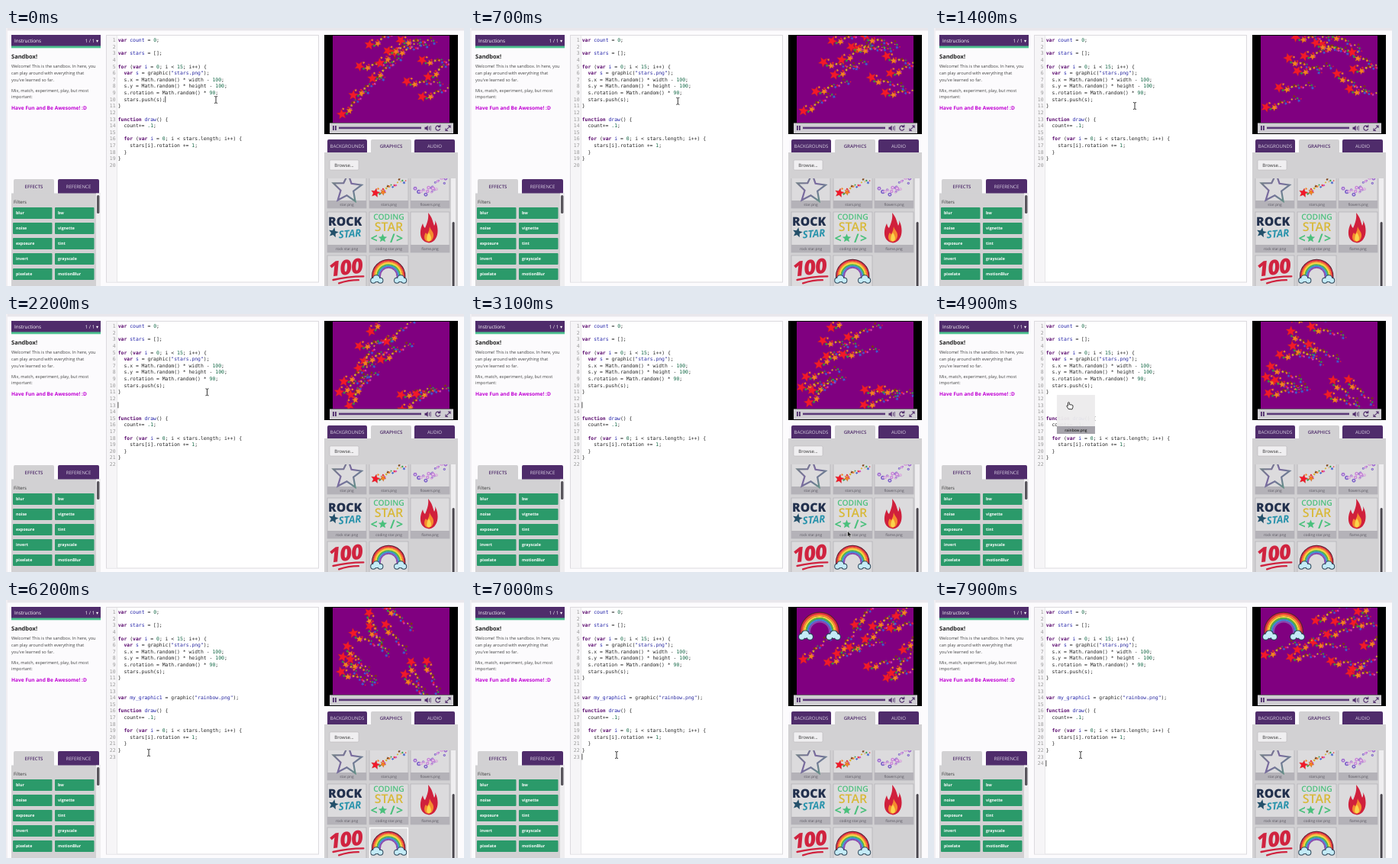
Recreate the animation shown at these times as an HTML page. Size 600 by 338 pixels, loop 8000 ms.

```html
<!DOCTYPE html>
<html>
<head>
<meta charset="utf-8">
<style>
html, body { margin: 0; width: 100%; height: 100%; overflow: hidden; background: #fcfbfd; }
svg { display: block; width: 600px; height: 338px; }
text { font-family: "Open Sans", "Noto Sans", sans-serif; text-rendering: geometricPrecision; white-space: pre; }
.mono text { font: 6.43px "DejaVu Sans Mono", monospace; fill: #222; }
.mono .num { fill: #999; text-anchor: end; }
.key { fill: #5a0a6e; font-weight: bold; }
.str { fill: #2a2aa0; }
.lit { fill: #116644; }
.def { fill: #2020a8; }
</style>
</head>
<body>
<svg viewBox="0 0 600 338">
  <defs>
    <clipPath id="stageClip"><rect x="428" y="10" width="153" height="114"/></clipPath>
    <clipPath id="gridClip"><rect x="417" y="197" width="165" height="141"/></clipPath>
    <linearGradient id="starInk" x2="1" y2="1">
      <stop offset="0" stop-color="#6f8c7c"/><stop offset=".5" stop-color="#7a68a0"/><stop offset="1" stop-color="#5f9a80"/>
    </linearGradient>
    <g id="swoosh"></g>
    <g id="rainbow"></g>
  </defs>
  <g id="page"></g>
  <g id="stage" clip-path="url(#stageClip)"></g>
  <g id="code" class="mono"></g>
  <rect id="caret" width=".8" height="8" fill="#222"/>
  <rect id="focus" x="476.5" y="298.5" width="50" height="54" fill="none" stroke="#fff" stroke-width="1.6"/>
  <g id="ghost">
    <g id="trail"><rect class="lag" width="50" height="50"/><rect class="lag" width="50" height="50"/></g>
    <g id="drag"></g>
  </g>
  <g id="beam" fill="none" stroke="#333" stroke-width="1"><path d="M-2-4.5Q0-4.5 0-3.5Q0-4.5 2-4.5M0-3.5V3.5M-2 4.5Q0 4.5 0 3.5Q0 4.5 2 4.5"/></g>
  <g id="arrow"><path d="M-1.5-4V4L.4 2.3L1.6 5L3 4.4L1.8 1.8H4.3Z" fill="#222" stroke="#fff" stroke-width=".6"/><circle id="plus" cx="5" cy="4" r="2.3" fill="#4f9a3c"/></g>
  <g id="hand"><path d="M-1.8 4.5L-4.2 .5Q-4-.9-2.4 .3V-4Q-1.4-5.2-.6-4V-1.2Q2.8-1.6 4-.2V2.2L3 4.8Z" fill="#fff" stroke="#222" stroke-width=".9"/></g>
</svg>
<script>
const LOOP = 8000, PURPLE = '#4f2c6b', GRAY = '#d2d1d3', TRACK = '#efeef0', GREEN = '#2b9a6a';
const CHAR = 3.87, LINE = 8.61, CODE_X = 146.7;
const $ = id => document.getElementById(id);

function random(seed) {
  return () => (seed = (seed * 16807) % 2147483647) / 2147483647;
}
const rect = (x, y, w, h, fill, more = '') =>
  `<rect x="${x}" y="${y}" width="${w}" height="${h}" fill="${fill}" ${more}/>`;
const label = (s, x, y, size, fill, more = '') =>
  `<text x="${x}" y="${y}" font-size="${size}" fill="${fill}" ${more}>${s}</text>`;
const path = (d, fill, more = '') => `<path d="${d}" fill="${fill}" ${more}/>`;
const MID = 'text-anchor="middle"', BOLD = 'font-weight="bold"';

function star(x, y, r, fill, turn = 0, more = '') {
  let pts = '';
  for (let i = 0; i < 10; i++) {
    const a = turn + i * Math.PI / 5 - Math.PI / 2, d = i % 2 ? r * 0.45 : r;
    pts += `${(x + d * Math.cos(a)).toFixed(2)},${(y + d * Math.sin(a)).toFixed(2)} `;
  }
  return `<polygon points="${pts}" fill="${fill}" ${more}/>`;
}

// Reusable pictures
function makeSwoosh() {
  const rnd = random(4711);
  const small = ['#f58220', '#2f9e3f', '#3d5fd0', '#e8202c', '#d63fb0', '#d8b020', '#7a3c10'];
  let s = '';
  for (let i = 0; i < 18; i++) {
    const t = i / 17, x = 4 + t * 40, y = -t * 19 + (rnd() - 0.5) * 13;
    s += star(x, y, 1 + rnd() * 1.5, small[i % small.length], rnd() * 6);
  }
  return s + star(11, -1, 4.6, '#f58220', 0.5, 'stroke="#a0401c" stroke-width=".3"') +
    star(0, 0, 6.8, '#f2182a', 0.2, 'stroke="#b0301c" stroke-width=".3"');
}

function makeRainbow() {
  const bands = ['#e2303f', '#f58a2c', '#f8d83c', '#4fb548', '#3a8fd8', '#8a4bb0'];
  const puffs = [[-20, 5.8, 4], [-16, 3.2, 5], [-10.8, 5.8, 4]];
  let s = path('M-21.5 4V0A21.5 21.5 0 0 1 21.5 0V4', 'none', 'stroke="#5a2030" stroke-width="1.4"');
  bands.forEach((c, i) => {
    const r = 20.2 - i * 1.8;
    s += path(`M${-r} 4V0A${r} ${r} 0 0 1 ${r} 0V4`, 'none', `stroke="${c}" stroke-width="1.9"`);
  });
  for (const side of [-1, 1]) for (const edge of [1, 0]) for (const [x, y, r] of puffs)
    s += `<circle cx="${x * side}" cy="${y}" r="${r - 1 + edge}" fill="${edge ? '#2b4558' : '#c4ebf7'}"/>`;
  return s;
}

function tab(name, x, y, w, h, active) {
  return path(`M${x} ${y + h}V${y + 2}q0-2 2-2H${x + w - 2}q2 0 2 2V${y + h}Z`, active ? GRAY : PURPLE) +
    label(name, x + w / 2, y + h / 2 + 2.2, 6.1, active ? PURPLE : '#d9d0e2', MID + (active ? ' font-weight="600"' : ''));
}

function card(x, y, name) {
  return rect(x, y, 51, 53, '#dcdbdd', 'stroke="#b5b3b8" stroke-width=".8"') +
    rect(x, y + 43, 51, 10, '#b4b2b8') + label(name, x + 25.5, y + 49.6, 4.8, '#5d5a63', MID);
}

function leftPanel() {
  let s = rect(7, 9, 117, 15, PURPLE) + rect(7, 23.5, 117, 2.8, '#4cc18f') +
    label('Instructions', 11, 18.6, 6.35, '#fff') + label('1 / 1 ▾', 121, 18.6, 6.2, '#fff', 'text-anchor="end"') +
    label('Sandbox!', 7, 39.5, 7.5, '#222', BOLD);
  ['Welcome! This is the sandbox. In here, you', "can play around with everything that", "you've learned so far.",
    'Mix, match, experiment, play, but most', 'important:'].forEach((row, i) => {
    s += label(row, 7, 52.3 + i * 8.6 + (i > 2 ? 5.6 : 0), 5.6, '#444');
  });
  s += label('Have Fun and Be Awesome! :D', 7, 107, 6.6, '#c000d4', BOLD) +
    tab('EFFECTS', 10, 198, 53, 19, true) + tab('REFERENCE', 68, 198, 54, 19, false) +
    rect(7, 216.5, 117, 122, GRAY) + label('Filters', 10, 229.5, 6, '#333') +
    rect(118, 216.5, 6, 122, TRACK) + rect(119, 219, 3.4, 24, '#58555c', 'rx="1.5"');
  ['blur', 'bw', 'noise', 'vignette', 'exposure', 'tint', 'invert', 'grayscale', 'pixelate', 'motionBlur'].forEach((name, i) => {
    const x = i % 2 ? 64 : 9, y = 235 + (i >> 1) * 20;
    s += rect(x, y, 51.5, 15, GREEN, 'rx="1"') + label(name, x + 4, y + 9.4, 5.3, '#fff', BOLD);
  });
  return s;
}

function player() {
  return rect(417, 9, 175, 130, '#000') + rect(428, 10, 153, 114, '#800080') + rect(424, 124.5, 162, 13.5, '#d0ced3') +
    rect(428, 128, 1.8, 6, PURPLE) + rect(431, 128, 1.8, 6, PURPLE) + rect(436, 129.6, 108, 2.6, '#5b3a78') +
    path('M548.5 129.7h1.8l2.4-2v7l-2.4-2h-1.8zM554 129v4.4h.8V129zM555.8 128v6.4h.8V128z', PURPLE) +
    path('M568.2 129.3A3 3 0 1 0 568.7 132M566 129.6h2.8v-2.8', 'none', `stroke="${PURPLE}" stroke-width="1.1"`) +
    path('M576.5 134L581.5 128.5M579 128h3v3M576 131.5v3h3', 'none', `stroke="${PURPLE}" stroke-width="1.1"`);
}

function graphics() {
  const rnd = random(99);
  let s = card(421, 183, 'star.png') + card(476, 183, 'stars.png') + card(530, 183, 'flowers.png') +
    card(421, 241, 'rock star.png') + card(476, 241, 'coding star.png') + card(530, 241, 'flame.png') +
    card(421, 298, '100.png') + card(476, 298, 'rainbow.png');
  s += star(447, 210.5, 19.5, 'none', 0.06, 'stroke="url(#starInk)" stroke-width="2.2"') +
    '<use href="#swoosh" transform="translate(484 216) scale(.9)"/>';
  for (let i = 0; i < 24; i++) {
    const x = 536 + rnd() * 40, y = 217 - (x - 536) * 0.4 + (rnd() - 0.5) * 14, r = 1 + rnd() * 1.8;
    s += `<circle cx="${x}" cy="${y}" r="${r}" fill="${['#a070d0', '#c98ad8', '#7f66c8', '#d3a4d8'][i % 4]}"/>` +
      `<circle cx="${x}" cy="${y}" r="${r * 0.35}" fill="#f2e4f2"/>`;
  }
  s += label('ROCK', 422, 258.7, 15.8, '#22304d', 'font-weight="800"') + star(429, 268, 6.8, '#24506a', 0.2) +
    '<g transform="rotate(-5 452 269)">' +
    label('STAR', 435.5, 274, 13.4, '#2a93ac', 'font-weight="bold" font-style="italic"') + '</g>' +
    label('CODING', 501.5, 251, 10.3, '#4ac07c', MID + ' font-weight="600"') +
    label('STAR', 501.5, 266.3, 16, '#d8b93a', MID + ' font-weight="600"') +
    label('&lt;', 477.5, 281, 16, '#4ac07c', BOLD) + star(493.5, 275.5, 6, '#4ac07c') +
    label('/&gt;', 503, 281, 16, '#4ac07c', BOLD + ' letter-spacing="1.5"');
  s += path('M553 242C559 249 559 254 561 259Q563 256 562 252C568 262 567 280 554 281.5C541 280 541 266 546 256Q547 261 549 262C552 255 554 249 553 242Z', '#d0203c') +
    path('M555 260C556 265 561 267 560 273C559 278 556 280 553 280C547 279 547 272 550 268Q551 270 552 270Q555 265 555 260Z', '#f58b2e') +
    path('M554 268Q558 274 556.5 278Q554 280.5 551.5 278Q550.5 273 554 268Z', '#fad54c');
  s += '<g transform="rotate(-7 446 316)">' +
    label('100', 445, 323, 27, '#d0233f', MID + ' font-weight="800" font-style="italic" letter-spacing="-1"') +
    path('M427 327.8Q446 325.5 467 328M434 333Q447 330.5 460 332', 'none', 'stroke="#d0233f" stroke-width="2.4" stroke-linecap="round"') + '</g>';
  return s + '<use href="#rainbow" x="501.2" y="325"/>';
}

function rightPanel() {
  return player() + tab('BACKGROUNDS', 421, 146, 52, 18, false) + tab('GRAPHICS', 478, 146, 53, 18, true) +
    tab('AUDIO', 535, 146, 53, 18, false) + rect(417, 163, 175, 175, GRAY) +
    rect(424, 173, 38, 13, '#f0eff1', 'rx="1.5" stroke="#b9b7bb" stroke-width=".6"') + label('Browse...', 443, 181.8, 6, '#333', MID) +
    `<g clip-path="url(#gridClip)">${graphics()}</g>` + rect(583, 197, 6, 141, TRACK) + rect(584.6, 254, 3, 90, '#4a474e', 'rx="1.5"');
}

// Source text shown in the editor
const head = ['var count = 0;', '', 'var stars = [];', '', 'for (var i = 0; i < 15; i++) {', '  var s = graphic("stars.png");',
  '  s.x = Math.random() * width - 100;', '  s.y = Math.random() * height - 100;', '  s.rotation = Math.random() * 90;', '  stars.push(s);', '}'];
const tail = ['function draw() {', '  count+= .1;', '', '  for (var i = 0; i < stars.length; i++) {', '    stars[i].rotation += 1;', '  }', '}', ''];
const dropped = ['', '', 'var my_graphic1 = graphic("rainbow.png");', ''];
const edits = [[0, ['']], [1650, ['', '']], [1900, ['', '', '']], [5200, dropped], [7500, dropped, ['']]];

function paint(line) {
  const span = (kind, s) => `<tspan class="${kind}">${s}</tspan>`;
  return line.replace(/"[^"]*"|\b(var|function)( )(\w+)|\bfor\b|\.?\b\d+\b|</g, (m, word, gap, name) =>
    word ? span('key', word) + gap + span('def', name)
      : m === '<' ? '&lt;' : m === 'for' ? span('key', m) : span(m[0] === '"' ? 'str' : 'lit', m));
}
function codeMarkup([, middle, extra = []]) {
  return [...head, ...middle, ...tail, ...extra].map((line, i) => {
    const y = 18.2 + i * LINE;
    return `<text class="num" x="143.5" y="${y}">${i + 1}</text><text x="${CODE_X}" y="${y}">${paint(line)}</text>`;
  }).join('');
}

// Each run: start, time at which the big stars sit on the given places, seed, places
const runs = [
  [0, 0, 11, [463,50, 480,66, 490,46, 508,32, 517,16, 476,22, 440,113, 455,88, 545,42, 553,64, 545,90, 525,70, 500,30]],
  [2000, 3100, 23, [495,30, 462,35, 467,55, 457,66, 489,53, 440,82, 434,96, 448,100, 444,116, 473,18, 517,99, 537,98, 516,119]],
  [6600, 7900, 37, [500,27, 497,55, 525,28, 550,30, 555,15, 467,75, 476,65, 433,72, 520,80, 545,95, 563,60, 515,45, 548,90]]
].map(([start, rest, seed, at]) => {
  const rnd = random(seed * 7919), sprites = [];
  for (let i = 0; i < at.length; i += 2) sprites.push({ x: at[i], y: at[i + 1], turn: rnd() * 55 - 20 });
  return { start, rest, sprites };
});

const mouse = [[0, 275, 94], [500, 275, 94], [1400, 263, 102], [2200, 263, 102], [2700, 490, 268], [3100, 496, 288], [3350, 502, 320],
  [3500, 502, 320], [4100, 322, 161], [4600, 190, 118], [4900, 178, 120], [5200, 168, 128], [5500, 168, 130], [6200, 187, 200],
  [6600, 192, 203], [8000, 192, 203]];
function mouseAt(t) {
  const i = Math.max(1, mouse.findIndex(k => k[0] > t));
  const [t0, x0, y0] = mouse[i - 1], [t1, x1, y1] = mouse[i];
  const u = (t - t0) / (t1 - t0);
  return [x0 + (x1 - x0) * u, y0 + (y1 - y0) * u];
}
function caretAt(t) {
  if (t < 1500) return [10, 16];
  if (t < 1650) return [11, 1];
  if (t < 3500) return [t < 1900 ? 12 : 13, 0];
  return t < 6600 ? null : [t < 7500 ? 23 : 24, 0];
}

$('swoosh').innerHTML = makeSwoosh();
$('rainbow').innerHTML = makeRainbow();
$('page').innerHTML = rect(0, 0, 600, 338, '#fcfbfd') + rect(0, 0, 600, 3.5, '#e9e7ec') + rect(0, 0, 2, 338, '#f0eef2') +
  rect(131.5, 9.5, 278, 323.5, '#fff', 'stroke="#dcdade" stroke-width="1"') + rect(132, 10, 13.2, 322.5, '#f6f5f7') +
  rect(145, 10, 0.7, 322.5, '#dddbdf') + leftPanel() + rightPanel();
$('stage').innerHTML = '<use class="sprite" href="#swoosh"/>'.repeat(13) +
  '<use id="bow" href="#rainbow" transform="translate(458 41.5) scale(1.17)"/>';
$('drag').innerHTML = rect(0, 0, 50, 51, '#ecebed', 'opacity=".95"') + rect(0, 41, 50, 10, '#a5a3aa') +
  label('rainbow.png', 25, 47.8, 4.9, '#222', MID + ' font-weight="600"');
const sprites = document.querySelectorAll('.sprite'), lags = document.querySelectorAll('.lag');
lags.forEach(el => { el.setAttribute('fill', '#f1f0f2'); el.setAttribute('stroke', '#d6d4d9'); el.setAttribute('stroke-width', '.7'); });

const show = (id, on) => { $(id).style.display = on ? '' : 'none'; };
const move = (el, x, y) => el.setAttribute('transform', `translate(${x} ${y})`);
const latest = (list, t, time) => list.filter(e => time(e) <= t).pop();
let shownEdit;

function draw(now) {
  const t = now % LOOP;
  const edit = latest(edits, t, e => e[0]);
  if (edit !== shownEdit) $('code').innerHTML = codeMarkup(shownEdit = edit);

  // Every swoosh spins about its own middle
  const run = latest(runs, t, r => r.start), spin = (t - run.rest) * 0.02;
  run.sprites.forEach((s, i) => sprites[i].setAttribute('transform',
    `translate(${s.x} ${s.y}) rotate(${s.turn}) rotate(${spin} 20 -9)`));
  show('bow', t >= 6600);
  show('focus', t >= 5200 && t < 6600);

  const caret = caretAt(t);
  show('caret', caret && (t + 100) % 1000 < 500);
  if (caret) move($('caret'), CODE_X + caret[1] * CHAR - 0.2, 12 + (caret[0] - 1) * LINE);

  const [x, y] = mouseAt(t), dragging = t >= 3500 && t < 5200;
  const typing = (t > 1650 && t < 2200) || (t > 7500 && t < 7700);
  const kind = dragging ? (t < 4500 ? 'arrow' : 'hand') : x > 146 && x < 409 ? 'beam' : 'arrow';
  for (const id of ['beam', 'arrow', 'hand']) {
    show(id, id === kind && !typing);
    move($(id), x, y);
  }
  show('plus', dragging);
  show('ghost', dragging);
  show('trail', t < 4600);
  move($('drag'), x - 17, y - 14);
  lags.forEach((el, i) => {
    const [lx, ly] = mouseAt(Math.max(3500, t - 20 + i * 10));
    move(el, lx - 17, ly - 14);
  });
  requestAnimationFrame(draw);
}
requestAnimationFrame(draw);
</script>
</body>
</html>
```
